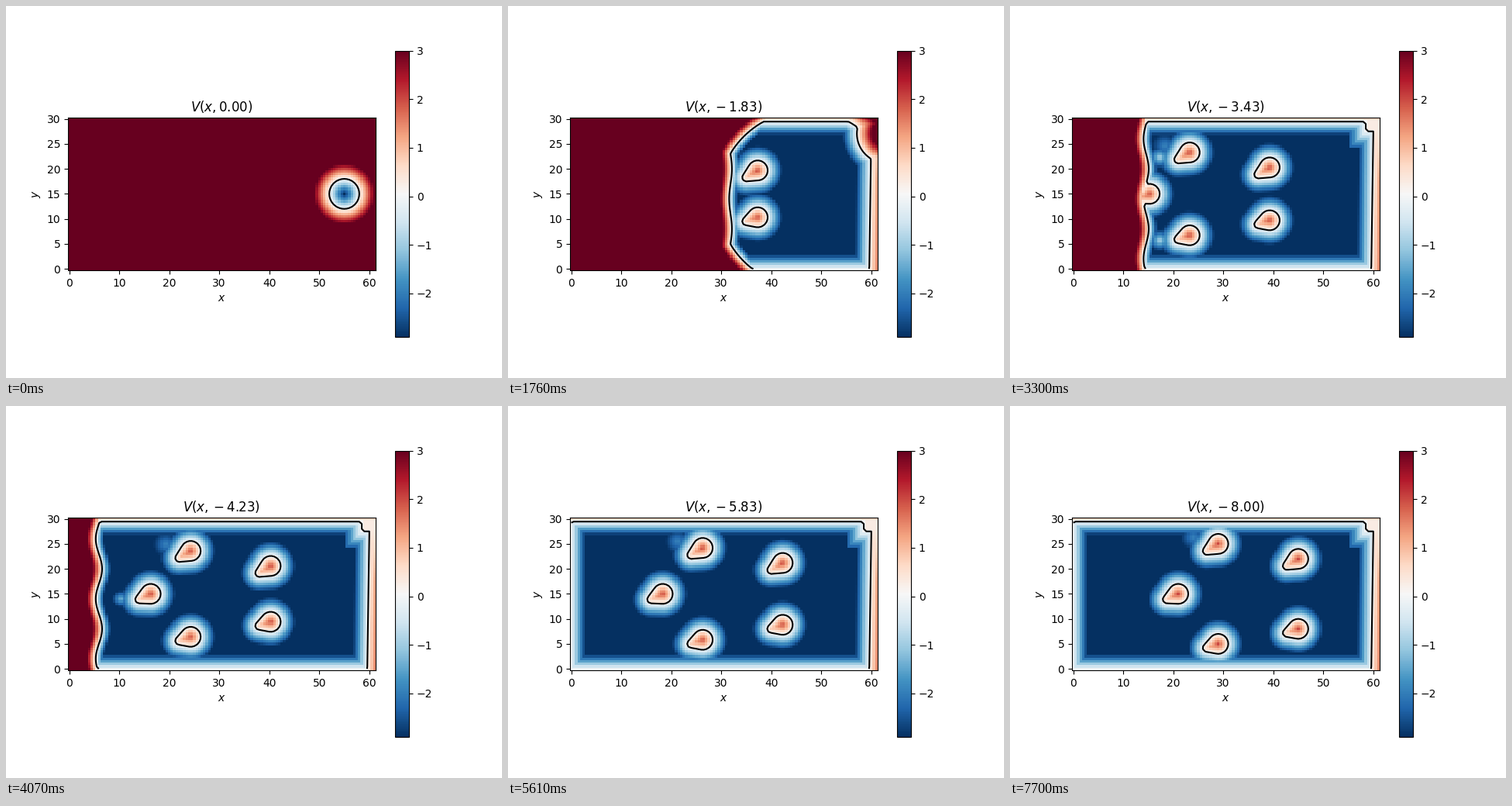
A matplotlib script for the animation above (7.81 s loop, 640 by 480 pixels).

```python
import numpy as np
import matplotlib.pyplot as plt
from matplotlib.animation import FuncAnimation

FRAMES, T_END = 71, 8.0
V_MIN, V_MAX = -2.9, 3.0
START_X, START_Y, START_R = 55, 15, 3

# Obstacle positions at s = 0: x and offset from the middle line
OBSTACLES = [(x, side * gap)
             for x, gap in ((11, 0), (19, 7), (35, 4))
             for side in ((1, -1) if gap else (0,))]
DRIFT, CLIMB = 1.25, 0.375

xs = np.arange(0, 61.25, 0.5)
ys = np.arange(0, 30.25, 0.5)
X, Y = np.meshgrid(xs, ys)


def dist(x, y):
    return np.hypot(X - x, Y - y)


def growing_disc(s, vx, vy, growth):
    """Start disc that drifts and grows with time."""
    return dist(START_X + vx * s, START_Y + vy * s) - START_R - growth * s


def front_x(s):
    return 51.6 - 10.8 * s


def front(s):
    discs = np.minimum(growing_disc(s, -4.4, -0.55, 8),
                       growing_disc(s, -1, -5.3, 5.3))
    ripple = -0.15 * s * np.cos(2 * np.pi * (Y - 14) / 12)
    edge = front_x(s) + ripple - X
    steep = 1 + 0.75 * np.clip((56 - X) / 14, 0, 1) * min(s, 1)
    return np.maximum(discs, edge) * steep


def walls():
    right = np.minimum(X - 59.6 - 0.015 * Y,
                       0.3 + 0.08 * np.maximum(28 - Y, 0))
    reach = np.maximum(60.5 - X, 29.5 - Y)
    corner = np.where(reach < 5.2, np.minimum(0.3, 0.75 * (2 - reach)), V_MIN)
    return np.maximum.reduce(
        [-X - 0.05, -Y - 0.05, 1.1 * (Y - 29.45), right, corner])


WALLS = walls()


def obstacle(s, x, offset):
    climb = CLIMB * np.sign(offset)
    cx, cy = x + DRIFT * s, START_Y + offset + climb * s
    tail_x, tail_y = -2.3, -1.1 - 0.8 * climb
    # Shrinking discs along the tail form the drop shape
    drop = [2 - 1.2 * u - dist(cx + u * tail_x, cy + u * tail_y)
            for u in np.linspace(0, 1, 9)]
    # Wake that fades as the front moves away
    age = max(cx - front_x(s) - 9, 0)
    wake = -0.8 - 0.35 * age - dist(cx - 6, cy - 1)
    return np.maximum.reduce(drop + [wake])


def far_corner(s):
    """Last unreached part, shrinking into the upper right corner."""
    k = np.clip((2.5 - s) / 1.36, 0, 1)
    radius = 2.2 + 7.4 * k - 2 * max(s - 2.5, 0)
    return radius - dist(61 + 4 * k, 30 - 6 * k)


def value(s):
    layers = [front(s), WALLS, far_corner(s)]
    layers += [obstacle(s, *spot) for spot in OBSTACLES]
    # Trace of the start point, and the streak behind the upper obstacle
    glow = 1.1 * np.clip(1 - abs(s - 1) / 0.8, 0, 1) ** 0.5
    layers.append(-3 + glow - 0.35 * dist(55.2, 15.2))
    layers.append(-1.9 - 0.4 * dist(14 + DRIFT * s, 23.3 + CLIMB * s))
    return np.clip(np.maximum.reduce(layers), V_MIN, V_MAX)


fig, ax = plt.subplots(figsize=(6.4, 4.8), dpi=100)
mesh = ax.pcolormesh(X, Y, value(0), cmap="RdBu_r", vmin=V_MIN, vmax=V_MAX,
                     shading="nearest")
fig.colorbar(mesh, ax=ax)
ax.set_aspect("equal")
ax.set_xlim(-0.25, 61.25)
ax.set_ylim(-0.25, 30.25)
ax.set_xlabel("$x$")
ax.set_ylabel("$y$")
lines = []


def update(i):
    s = T_END * i / (FRAMES - 1)
    v = value(s)
    mesh.set_array(v)
    while lines:
        lines.pop().remove()
    lines.append(ax.contour(X, Y, v, levels=[0], colors="k", linewidths=1.5))
    sign = "-" if i else ""
    ax.set_title(f"$V(x,{sign}{s:.2f})$")
    return [mesh]


anim = FuncAnimation(fig, update, frames=FRAMES, interval=110, repeat=True,
                     init_func=lambda: update(0), blit=False)
plt.show()
```
